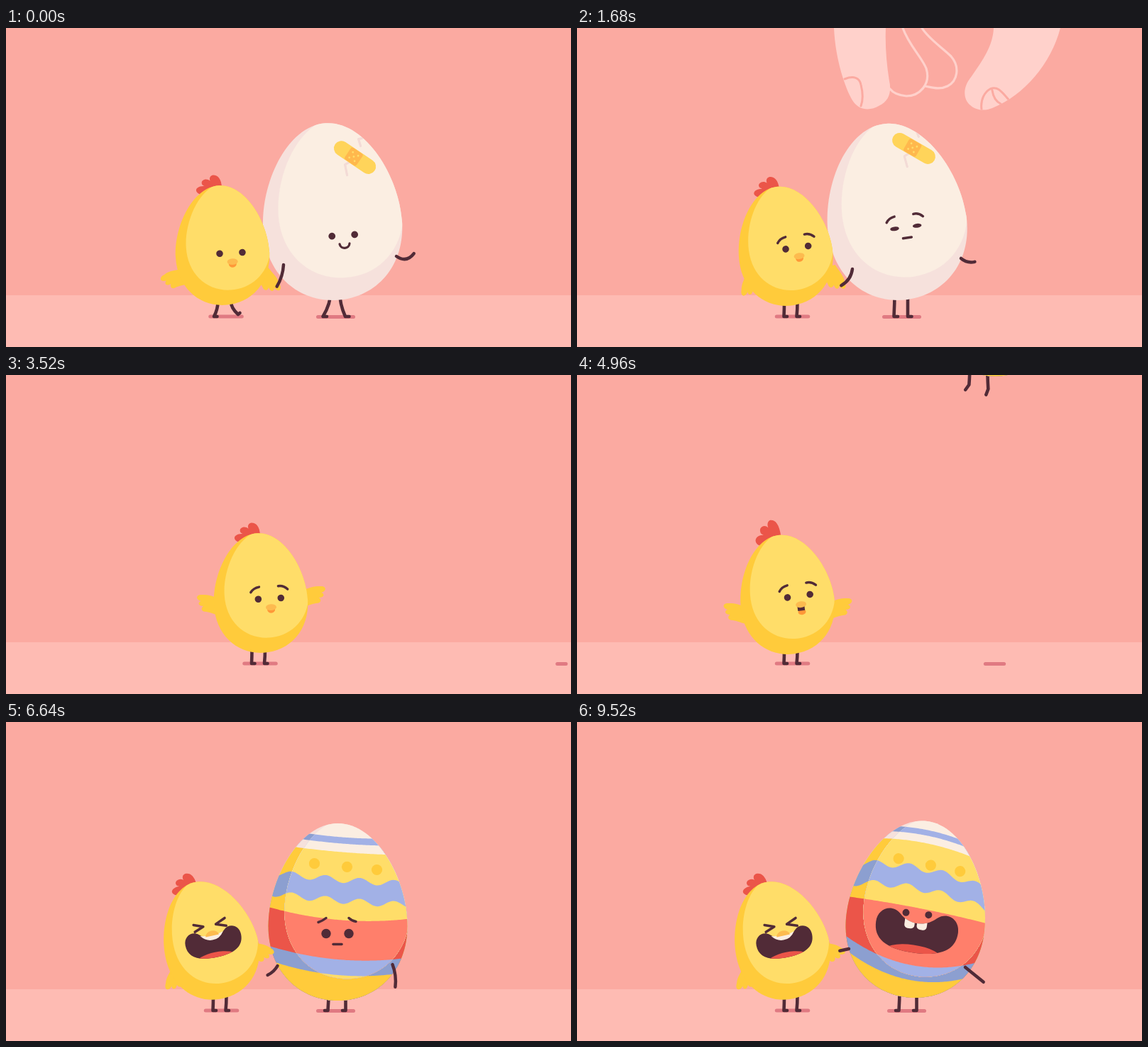
These frames come from a looping animation (796x450 px, 9.6 s). An HTML page with a canvas:

```html
<!DOCTYPE html>
<html lang="en">
<head>
<meta charset="utf-8">
<title>Egg and chick</title>
<style>
html, body { margin: 0; width: 100%; height: 100%; overflow: hidden; background: #fbaaa1; }
canvas { display: block; }
</style>
</head>
<body>
<canvas width="796" height="450"></canvas>
<script>
const c = document.querySelector('canvas').getContext('2d');
const LOOP = 9600, TAU = Math.PI * 2, RAD = Math.PI / 180;
const DARK = '#512b37', YELLOW = '#ffdd69', GOLD = '#ffcb3b', RED = '#eb5549', CREAM = '#fbeee2';
const SKIN = '#ffd1cb', WALL = '#fbaaa1', BEAK = '#fdbb4f', BEAK_SHADE = '#ff9838';
const LIGHT_PAINT = { cream: CREAM, yellow: YELLOW, blue: '#a2b1e6', red: '#ff7f6b' };
const SHADE_PAINT = { cream: '#f6e1dc', yellow: GOLD, blue: '#8c9fd0', red: RED };

const P = d => new Path2D(d);
const EGG = P('M0-142C55-142 98-62 98 3C98 66 55 108 0 108C-55 108-98 66-98 3C-98-62-55-142 0-142Z');
const WING = P('M-12-9C-2-12 6-17 16-16C25-17 27-10 18-7C23-6 23 0 15 0C19 3 18 8 11 8C4 9 0 12-12 14Z');
const COMB = P('M4-92C4-106-1-111-8-111C-13-110-13-105-12-103C-17-108-25-105-24-100C-24-98-22-97-20-96C-27-97-34-94-32-89C-30-85-24-83-14-84Z');
const MOUTH = P('M-40-6C-40-19-27-25-18-17C-8-7 8-7 18-17C27-25 40-19 40-6C40 10 28 19 0 19C-28 19-40 10-40-6Z');
const GRIN_TEETH = P('M-17-15Q0-10 16-15Q9-5-1-6Q-10-6-17-15Z');
const SQUINT = P('M-23-32L-10-27L-23-22M22-33L8-27L22-22');
const WORRY = P('M-26-10Q-22-16-14-17M13-17Q20-18 26-12');
const SORROW = P('M-27-16Q-21-18-16-22M16-22Q20-18 26-17');
const SMILE = P('M-6 12C-5 20 7 20 8 12');
const FLAT = P('M-6 15L6 15');
const CRACK = P('M10-27L5-26L8-16M-3 4L-14 10L-11 25');
const FINGER_L = P('M365-400C370-200 360-60 362 0C364 45 378 85 388 102C398 118 415 116 425 110C441 103 443 88 440 75C436 50 434 25 435 0C437-60 450-200 460-400Z');
const FINGER_R = P('M587 0C586 25 572 45 556 68C542 85 545 100 553 108C562 117 575 117 585 113C630 95 668 50 681 0C695-60 690-200 690-400L580-400C580-200 590-60 587 0Z');
const FOLDED = P('M400-120C430-60 450-20 459 0C468 25 485 40 492 57C499 80 482 96 464 96C452 95 445 91 441 86M440-120C460-60 475-20 486 0C495 15 515 28 527 40C540 55 536 75 522 82C510 88 498 83 490 82');
const NAILS = P('M377 72C390 67 398 70 400 80C403 92 403 102 400 110M570 115C568 100 575 90 582 86C592 82 597 88 608 101M585 88Q587 102 597 107');

// Egg moods: face centre, and arms as [x, y, angle, length, bend]
const HAPPY = { face: [14, 17.5], right: [90, 46, -9, 25, 12], left: [-69, 58, 107, 32, -4] };
const WARY = { face: [11.5, 6.7], right: [90, 49, 14, 20, 5], left: [-63, 64, 124, 28, -7] };
const SAD = { face: [-.5, 13.5], right: [77, 57, 83, 32, -4], left: [-85, 59, 137, 19, -3] };
const MERRY = { face: [1.3, -10.7], right: [70, 65, 39, 33, 0], left: [-94, 39, 168, 13, 0] };

// Chick wings: left x, y, angle, then right x, y, angle
const WALKING = [-60, 35, 32, 60, 34, 70], LOWERED = [-45, 36, 85, 64, 29, 75], POINTING = [-46, 37, 80, 61, 5, 32];

const progress = (t, from, to) => Math.min(1, Math.max(0, (t - from) / (to - from)));
const ease = (t, from, to) => { const u = progress(t, from, to); return u * u * (3 - 2 * u); };
const mix = (a, b, u) => a + (b - a) * u;
const blend = (a, b, u) => a.map((v, i) => mix(v, b[i], u));

// Every pose is derived from these story beats
function beats(t) {
  const worry = ease(t, 150, 1000), glee = ease(t, 6300, 6480), merry = ease(t, 7150, 7400);
  const away = ease(t, 2150, 3200), back = progress(t, 3500, 5700) ** 1.2;
  const home = ease(t, 4200, 4800);
  return {
    t, worry, glee, merry, away, back, home, far: away - back,
    chase: ease(t, 2350, 3400) - home,
    rock: Math.cos((t - 8080) * TAU / 960) * glee,
    painted: t > 3500, scared: t > 760
  };
}

function group(x, y, degrees, draw) {
  c.save();
  c.translate(x, y);
  c.rotate(degrees * RAD);
  draw();
  c.restore();
}
function inside(path, draw) {
  c.save();
  c.clip(path);
  draw();
  c.restore();
}
const fill = (path, color) => { c.fillStyle = color; c.fill(path); };
function line(path, width = 3.5, color = DARK) {
  c.lineWidth = width;
  c.strokeStyle = color;
  c.stroke(path);
}
function oval(x, y, rx, ry, color, from = 0) {
  c.beginPath();
  c.ellipse(x, y, rx, ry, 0, from, TAU);
  c.fillStyle = color;
  c.fill();
}
function box(x, y, w, h, r, color) {
  c.beginPath();
  c.roundRect(x, y, w, h, r);
  c.fillStyle = color;
  c.fill();
}
const shadow = (x, width, y) => line(P(`M${x - width / 2 + 2.5} ${y}h${width - 5}`), 5, '#e07a82');
const leg = (hx, hy, fx, fy, tx, ty) => line(P(`M${hx} ${hy}Q${hx} ${(hy + fy) / 2} ${fx} ${fy}l${tx} ${ty}`), 4.6);
const arm = (ox, oy, [x, y, angle, length, bend]) =>
  group(ox + x, oy + y, angle, () => line(P(`M0 0Q${length / 2} ${bend} ${length} 0`), 4.5));
const eyes = (rx, ry = rx) => [-16, 16].forEach(x => oval(x, 0, rx, ry, DARK));

function shell(decorate) {
  inside(EGG, () => {
    decorate(SHADE_PAINT);
    c.translate(13, -20);
    c.scale(.9, .9);
    c.clip(EGG);
    c.scale(1 / .9, 1 / .9);
    c.translate(-13, 20);
    decorate(LIGHT_PAINT);
  });
}
const plain = name => paint => { c.fillStyle = paint[name]; c.fillRect(-110, -150, 220, 270); };

// Fills all below a stripe edge; laughing makes the edges bulge away from the face
function band(color, y, sag, merry, wave = 0) {
  const half = 100 * Math.sqrt(1 - (y / 145) ** 2);
  const bulge = Math.sign(y - 20) * .13 * half * merry;
  c.beginPath();
  for (let x = -110; x <= 110; x += 2) {
    const q = (x / half) ** 2;
    c.lineTo(x, y + .087 * x - sag * q + bulge * (1 - q) - wave * Math.cos((x + 17) * TAU / 48));
  }
  c.lineTo(110, 130);
  c.lineTo(-110, 130);
  c.fillStyle = color;
  c.fill();
}
const easterPaint = merry => paint => {
  plain('cream')(paint);
  band(paint.blue, -123, 2, merry);
  band(paint.cream, -114, 2, merry);
  band(paint.yellow, -102, 2, merry);
  for (const x of [-33, 13, 55]) oval(x, -82 + .1 * x, 7.6, 7.6, GOLD);
  band(paint.blue, -63, 2, merry, 4.5);
  band(paint.yellow, -33.5, 2, merry, 4.5);
  band(paint.red, -6, 10, merry);
  band(paint.blue, 50, 10, merry);
  band(paint.yellow, 72, 10, merry);
};

function mouth(teeth) {
  fill(MOUTH, DARK);
  inside(MOUTH, () => {
    oval(-1, 22, 29, 10.5, RED);
    teeth();
  });
}

function bandage(y) {
  inside(EGG, () => group(38, y, 4, () => line(CRACK, 3.2, '#f3dbd6')));
  group(38, y, 38, () => {
    box(-33.5, -10.5, 67, 21, 10.5, '#ffd45a');
    box(-12, -10, 20, 20, 3, '#ffb84d');
    oval(-2, 0, 1.4, 1.4, YELLOW);
    for (const dx of [-4.5, 4.5]) for (const dy of [-4.5, 4.5]) oval(dx - 2, dy, 1.4, 1.4, YELLOW);
  });
}

function eggFace({ painted, scared, merry }, [x, y]) {
  group(x, y, 0, () => {
    if (!scared) {
      eyes(4.9);
      line(SMILE, 3.2);
    } else if (!painted) {
      eyes(6.3, 2.9);
      line(WORRY);
      line(FLAT);
    } else {
      eyes(mix(6.7, 5, merry));
      if (!merry) { line(SORROW); line(FLAT); }
    }
  });
  if (merry) group(2.6, 16.8, 2, () => {
    c.scale(1.46 * merry, 1.46 * merry);
    mouth(() => [-12.5, -.5].forEach(left => box(left, -16, 9.8, 12.2, 3.5, CREAM)));
  });
}

function eggPose(b) {
  const { t, worry, merry, rock, far, away, back, painted } = b;
  const carry = (happy, wary, after) => mix(mix(mix(happy, wary, worry), 784, away), after, back);
  const height = 611 * far * (2 - far);
  const bob = 3 * (Math.cos((t - 8080) * TAU / 360) - 1);
  const mood = name => painted ? blend(SAD[name], MERRY[name], merry) : blend(HAPPY[name], WARY[name], worry);
  return {
    height, mood,
    x: carry(460, 451, 467.5) + merry * (11.2 + 1.7 * rock),
    y: 276 + 9 * ease(t, 5650, 5900) - height + merry * (bob - 3.5 + .5 * rock),
    ground: carry(464.5, 457.5, 464.5),
    tilt: mix(mix(-4, -8, worry), 0, away) + 14 * Math.sin(Math.PI * far) + merry * (6.6 + .6 * rock)
  };
}

function egg(b, { x, y, tilt, ground, height, mood }) {
  const { t, worry, merry, painted } = b;
  shadow(ground, 55 - height * .062, 407.5);
  if (height > 4) {
    const hip = x - Math.sin(tilt * RAD) * 110;
    leg(hip - 12, y + 95, hip - 13, y + 120, -5, 7);
    leg(hip + 13, y + 95, hip + 14, y + 126, -3, 8);
  } else {
    const step = (1 - worry) * Math.cos(t * TAU / 640), toe = painted ? -4.5 : 5.5, stance = painted ? 14 : 8.5;
    leg(ground - 10 + 3 * step, y + 95, ground - 11 - 7 * step, 407, toe, 0);
    leg(ground + stance - 3 * step, y + 95, ground + stance + 5 * step, 407, toe, 0);
  }
  const face = mood('face');
  group(x, y, tilt, () => {
    shell(painted ? easterPaint(merry) : plain('cream'));
    if (!painted) bandage(face[1] - 108.5);
    eggFace(b, face);
  });
  arm(x, y, mood('right'));
}

function beak(open) {
  oval(1.5, open ? 23 : 15.5, 5.5, open ? 4 : 5, BEAK_SHADE);
  if (open) box(-4, 14, 10, 7, 0, DARK);
  oval(1.5, 12.3, 7.5, 4.4, BEAK);
}

function chickFace({ t, worry, chase, glee, scared }) {
  if (glee) {
    group(5, -4.5, 4, () => {
      mouth(() => 0);
      fill(GRIN_TEETH, CREAM);
      oval(0, -12, 9.5, 7, BEAK, Math.PI);
      line(SQUINT);
    });
    return;
  }
  group(12 + 5 * worry - 4.5 * chase, 4 * chase - 7 * worry, 0, () => {
    eyes(4.8);
    if (scared) line(WORRY);
    beak(t > 4500);
  });
}

function chick(b) {
  const { t, worry, chase, home, glee, rock } = b;
  const x = 305 - 11 * worry + 65 * chase + 2.5 * home - 2 * glee + 5 * rock;
  const y = 318 + worry + 2 * home - 2.6 * glee - .5 * rock;
  const tilt = -3 - 5 * worry + 5 * chase - 2.4 * glee + 5.2 * rock;
  const ground = 310 - 6.5 * worry + 54.5 * chase;

  const step = (1 - worry + 4 * chase * (1 - chase)) * Math.cos(t * TAU / 400), lift = Math.abs(step);
  shadow(ground, 49.5, 407);
  leg(ground - 11.5, y + 68, ground - 12 - 5 * step, 407, 4.5, 0);
  leg(ground + 7, y + 68, ground + 6 + 11 * step, 407 - 3 * lift, 4.5 - 2 * lift, -2 * lift);

  const spread = [-66, 17 - 10 * chase, 0, 67, 10 - 15 * chase, 0];
  const calm = blend(WALKING, LOWERED, worry);
  const [lx, ly, la, rx, ry, ra] = blend(blend(calm, spread, ease(t, 2250, 2500)), POINTING, glee);
  const flap = t > 2440 && t < 5320 ? 14 * Math.sin((t - 3520) * TAU / 360) : 0;
  group(x + lx, y + ly, -la - flap, () => { c.scale(-1, 1); fill(WING, GOLD); });
  group(x + rx, y + ry, ra + flap, () => fill(WING, GOLD));

  group(x, y, tilt, () => {
    group(0, -86, 0, () => {
      c.scale(1, 1 + .3 * (ease(t, 4300, 4900) - glee));
      c.translate(0, 86);
      fill(COMB, RED);
    });
    group(0, 0, 0, () => {
      c.scale(.675, .675);
      shell(plain('yellow'));
    });
    chickFace(b);
  });
}

function hand(t, body) {
  const grip = ease(t, 1700, 2100) - ease(t, 5720, 6200);
  const free = t < 4000 ? -140 * (1 - ease(t, 560, 960)) : -140;
  const x = mix(0, body.x - 501, grip), y = mix(free, 85 - body.height, grip);
  if (y < -130) return;
  group(x, y, 0, () => {
    line(FOLDED, 3.2, SKIN);
    for (const finger of [FINGER_L, FINGER_R]) {
      fill(finger, SKIN);
      inside(finger, () => line(NAILS, 3, WALL));
    }
  });
}

function frame(now) {
  const b = beats(now % LOOP), body = eggPose(b);
  c.lineCap = c.lineJoin = 'round';
  box(0, 0, 796, 450, 0, WALL);
  box(0, 377, 796, 73, 0, '#febbb3');
  egg(b, body);
  chick(b);
  arm(body.x, body.y, body.mood('left'));
  hand(b.t, body);
  requestAnimationFrame(frame);
}
requestAnimationFrame(frame);
</script>
</body>
</html>
```
